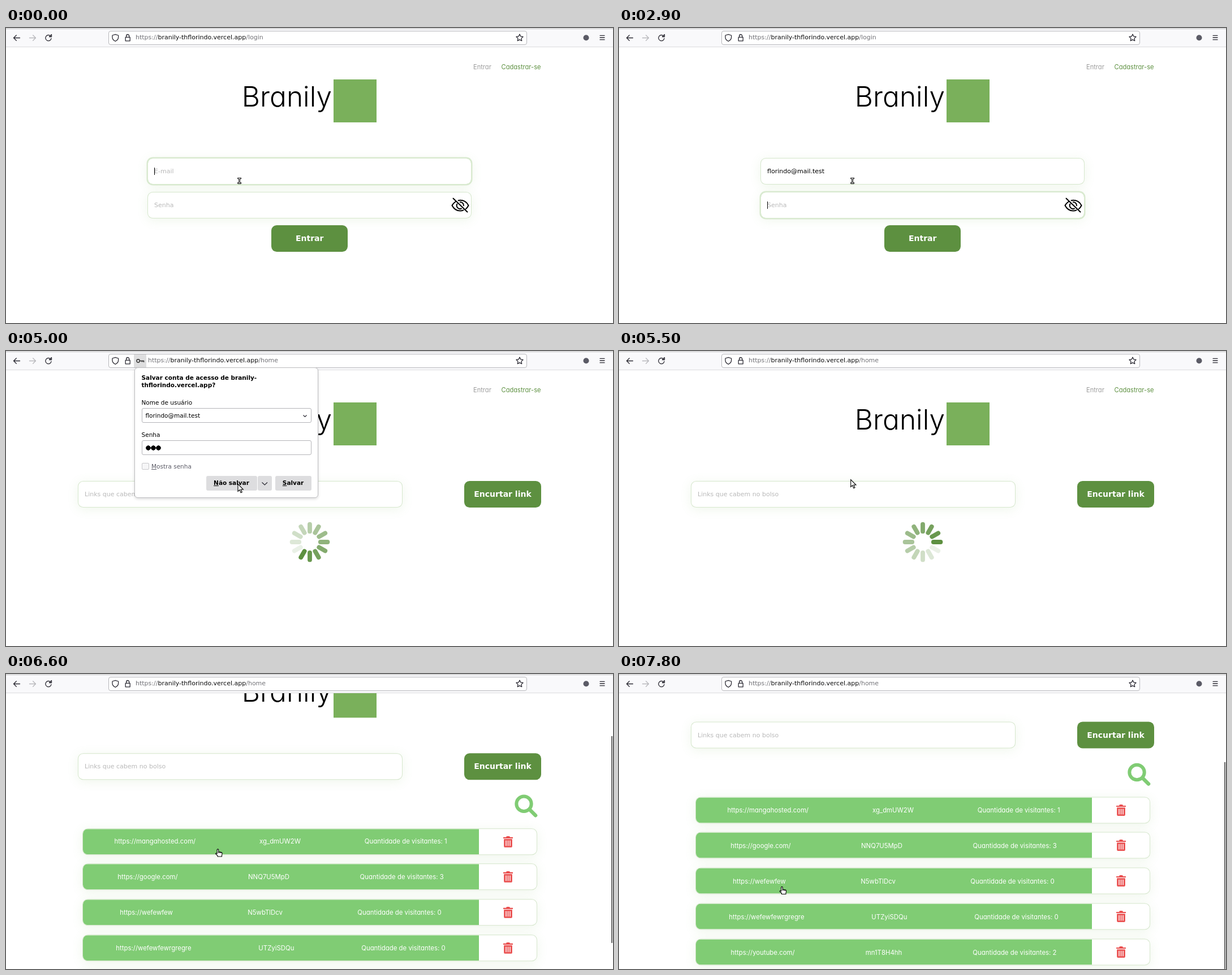
An HTML page for the animation above (8000 ms loop, 1073 by 522 pixels).

```html
<!DOCTYPE html>
<html lang="pt-BR">
<head>
<meta charset="utf-8">
<title>Encurtador de links</title>
<style>
  html, body { margin: 0; width: 100%; height: 100%; overflow: hidden; background: #fff; }
  body { position: relative; font: 11px/16px "DejaVu Sans", sans-serif; color: #000; }
  body *, .abs { box-sizing: border-box; }
  .abs, svg.abs { position: absolute; white-space: pre; }
  [hidden] { display: none !important; }
  .round { font: 11.1px/16px Inter, sans-serif; font-feature-settings: "cv11"; }
  .soft { color: #9c9c9c; }
  .green { color: #5d9040; }

  #brand { right: 497px; top: 91.4px; font: 300 49.6px/60px Inter, sans-serif; font-feature-settings: "cv11"; }
  #mark { left: 579px; top: 91px; width: 76px; height: 76px; background: #7ab05b; }

  .field, .row { border: 1px solid rgba(120,177,89,.3); border-radius: 9.5px; background: #fff;
    box-shadow: 0 3px 19px rgba(120,177,89,.12); }
  .field { width: 573px; height: 47px; padding-left: 11px; display: flex; align-items: center; }
  .field.focus { border-color: #cfe5c4; outline: 2px solid #d9ead0; outline-offset: -1px; }
  .field.focus { box-shadow: 0 0 0 1.5px #d9ead0, 0 3px 19px rgba(120,177,89,.12); }
  .field.off { background: #f1f1f1; }
  .field .hint { color: #b9b9b9; }
  .caret { width: 1px; height: 13px; margin-right: -1px; background: #000; }
  .bullets { height: 9px; background: radial-gradient(circle closest-side, #000 88%, transparent) 0 0 / 9.6px 9px; }
  .button { width: 135.4px; height: 47px; border-radius: 9.5px; background: #5d9040; color: #fff;
    font-weight: bold; font-size: 14px; line-height: 46px; text-align: center; }

  .row { left: 135px; width: 804px; height: 47px; overflow: hidden; }
  .row div { width: 701px; height: 100%; margin-left: -1px; background: #80cc74; color: #fff; font-size: 11.4px;
    display: flex; justify-content: space-around; align-items: center; }
  .row svg { position: absolute; left: 743px; top: 12px; }
  #bar { left: 1069.5px; top: 36px; width: 2.5px; height: 366px; background: #666; }

  #chrome { left: 0; top: 0; width: 1073px; height: 34px; background: #f9f9fb;
    border-bottom: 1px solid #dcdcde; box-shadow: inset 0 1px #f0f0f0, inset 0 2px #c4c4c6; }
  #address { left: 181px; top: 5px; width: 739.5px; height: 25px; background: #fff;
    border: 1px solid #b7b7bb; border-radius: 4px; }
  #url { top: 9px; color: #737378; }
  #url b { font-weight: normal; color: #0c0c0d; }
  #keybox { left: 226px; top: 6px; width: 22px; height: 23px; }

  #popup { left: 226.5px; top: 28.5px; width: 325px; height: 231.5px; background: #fff; font-size: 10.5px;
    border: 1px solid #bdbdc0; border-radius: 6px; box-shadow: 0 2px 5px rgba(0,0,0,.14); }
  #popup .box { left: 12.5px; width: 300px; height: 26px; border: 1px solid #b4b4b8; border-radius: 3px;
    padding-left: 5.5px; line-height: 24px; }
  #popup .act { top: 191.5px; height: 26px; background: #dddddf; border-radius: 3px; font-weight: bold;
    line-height: 25px; text-align: center; }
</style>
</head>
<body>
<div id="doc" class="abs" style="left:0;top:0;width:1073px;height:670px">
  <div id="guest" class="round">
    <span class="abs soft" style="left:826px;top:61px">Entrar</span>
    <span class="abs green" style="right:127.5px;top:61px">Cadastrar-se</span>
  </div>
  <div id="member" class="round">
    <span class="abs green" style="left:127px;top:61px">Seja bem-vindo(a), Florindo Pontelo!</span>
    <span class="abs soft" style="left:826px;top:61px">Home</span>
    <span class="abs soft" style="left:869px;top:61px">Ranking</span>
    <span class="abs soft" style="right:127.5px;top:61px">Sair</span>
  </div>
  <div id="brand" class="abs">Branily</div>
  <div id="mark" class="abs"></div>

  <div id="login">
    <div id="mail" class="abs field" style="left:250px;top:230px"><span></span><i class="caret"></i><span class="hint">E-mail</span></div>
    <div id="pass" class="abs field" style="left:250px;top:290px"><span class="bullets"></span><i class="caret"></i><span class="hint">Senha</span></div>
    <svg class="abs" style="left:787px;top:299px" width="32" height="30" fill="none" stroke="#000" stroke-width="2" stroke-linecap="round">
      <path d="M3.5 2.5L28.5 26.5M8 8C4.5 10.5 2.5 13 1.5 15C4 20 9 24.5 16 24.5C18 24.5 20 24 21.5 23.3M12.5 6.3C13.5 6 14.8 5.8 16 5.8C23 5.8 28 10 30.5 15C29.5 17.2 28 19.3 26 21M10.3 12.5A6 6 0 0 0 18 20.6M15.8 9A6 6 0 0 1 22 15.2"/>
    </svg>
    <div id="enter" class="abs button" style="left:469px;top:349px">Entrar</div>
    <svg id="wait" class="abs" style="left:469px;top:349px" width="135" height="47" fill="#fff"></svg>
  </div>

  <div id="home">
    <div class="abs field" style="left:127px;top:230.4px;width:574px"><span class="hint">Links que cabem no bolso</span></div>
    <div class="abs button" style="left:810.3px;top:230.4px">Encurtar link</div>
    <svg id="spinner" class="abs" style="left:498.5px;top:299.5px" width="76" height="76" viewBox="-24.2 -24.2 48.4 48.4" stroke="#5d9040" stroke-width="5" stroke-linecap="round"></svg>
    <div id="list" class="round">
      <svg class="abs" style="left:898px;top:302px" width="42" height="42" fill="none" stroke="#80cc74">
        <circle cx="17.5" cy="17.5" r="13.2" stroke-width="6"/>
        <path d="M28 28L38 38" stroke-width="6.5" stroke-linecap="round"/>
      </svg>
    </div>
  </div>
</div>
<div id="bar" class="abs"></div>

<div id="chrome" class="abs">
  <div id="address" class="abs"></div>
  <div id="keybox" class="abs"><svg width="22" height="23" fill="none" stroke="#333" stroke-width="1.4">
    <circle cx="7.6" cy="11.5" r="2.7"/><path d="M10.3 11.5H17.5V14M14.5 11.5V13.6"/></svg></div>
  <span id="url" class="abs">https://<b>branily-thflorindo.vercel.app</b><span></span></span>
  <svg class="abs" style="left:0;top:0" width="1073" height="34" fill="none" stroke="#2b2a33" stroke-width="1.3" stroke-linejoin="round" stroke-linecap="round">
    <path d="M24.5 17.5H13.5M18.3 12.7L13.5 17.5L18.3 22.3"/>
    <path stroke="#b8b8bc" d="M41.5 17.5H52.5M47.7 12.7L52.5 17.5L47.7 22.3"/>
    <path d="M80 18.5A5.1 5.1 0 1 1 78.6 14M80.5 11.5V15.5H76.5Z"/>
    <path d="M193.3 11.3L198.6 13V16.5C198.6 20 196.3 22 193.3 23.5C190.3 22 188 20 188 16.5V13Z"/>
    <path d="M211.2 16.3H219.2V22.8H211.2ZM212.7 16V14A2.5 2.5 0 0 1 217.7 14V16"/>
    <path d="M908 11L909.9 14.9L914 15.5L911 18.4L911.7 22.6L908 20.6L904.3 22.6L905 18.4L902 15.5L906.1 14.9Z"/>
    <circle cx="1025.5" cy="17.2" r="5" fill="#5b5b66" stroke="none"/>
    <path d="M1050 13.3H1058M1050 17H1058M1050 20.7H1058"/>
  </svg>
</div>

<div id="popup" class="abs">
  <b class="abs" style="left:12px;top:11.3px;line-height:13.6px">Salvar conta de acesso de branily-
thflorindo.vercel.app?</b>
  <span class="abs" style="left:12px;top:53px">Nome de usuário</span>
  <div class="abs box" style="top:71.5px">florindo@mail.test</div>
  <span class="abs" style="left:12px;top:110px">Senha</span>
  <div class="abs box" style="top:128px"></div>
  <div class="abs bullets" style="left:19px;top:137px;width:27px;background-size:9px 9px"></div>
  <div class="abs" style="left:12.5px;top:168px;width:12.5px;height:12.5px;border:1px solid #c8c8cb;border-radius:2px;background:#f6f6f7"></div>
  <span class="abs" style="left:29.5px;top:166px;color:#5b5b66"><u>M</u>ostra senha</span>
  <div class="abs act" style="left:126px;width:90px"><u>N</u>ão salvar</div>
  <div class="abs act" style="left:217px;width:25px"></div>
  <div class="abs act" style="left:248px;width:64px"><u>S</u>alvar</div>
  <svg class="abs" style="left:0;top:0" width="323" height="229" fill="none" stroke="#2b2a33" stroke-width="1.2">
    <path d="M297.5 83.5L300.5 86.5L303.5 83.5M224.5 202.5L229.3 207L234 202.5"/></svg>
</div>

<svg id="mouse" class="abs" style="left:0;top:0" width="1073" height="522">
  <g id="beam" fill="none" stroke="#000" stroke-width="2.8" stroke-linecap="round">
    <path id="stem" d="M-.6 -1.2H3.8M1.6 -1.2V7.2M-.6 7.2H3.8"/>
    <path d="M-.6 -1.2H3.8M1.6 -1.2V7.2M-.6 7.2H3.8" stroke="#fff" stroke-width=".9"/></g>
  <path id="arrow" d="M0 0V13L3 10.2L5.2 15.2L7.3 14.3L5.2 9.5H9.3Z" fill="#fff" stroke="#000" stroke-width="1.1"/>
  <path id="hand" d="M-1.3 8V0.8Q0 -1 1.2 0.8V4.6L6.4 5.6Q7.8 6 7.7 7.5L7 11V13H-.5V11.5L-4 8.2Q-3.8 6.2 -1.3 8ZM1.2 5V7M3.6 5.4V7M5.7 5.8V7.2" fill="#fff" stroke="#000" stroke-width="1.1" stroke-linejoin="round"/>
</svg>

<script>
const $ = id => document.getElementById(id);
const show = (id, on) => $(id).toggleAttribute('hidden', !on);

const email = 'florindo@mail.test';
const mailKeys = [100, 200, 400, 500, 600, 700, 900, 1000, 1400, 1800, 1900, 2000, 2100, 2300, 2500, 2600, 2700, 2800];
const passKeys = [3300, 3500, 3600];
const mousePath = [[0, 411, 267.3], [4600, 411, 267.3], [5100, 409.7, 227.5], [5600, 409.7, 227.5],
  [6200, 374.5, 310], [6800, 374.5, 310], [7600, 297, 347], [7800, 288, 376.5]];
const scrollPath = [[6300, 0], [6600, 89.7], [6700, 89.7], [7000, 145.5]];

const links = [
  ['https://mangahosted.com/', 'xg_dmUW2W', 1],
  ['https://google.com/', 'NNQ7U5MpD', 3],
  ['https://wefewfew', 'N5wbTlDcv', 0],
  ['https://wefewfewrgregre', 'UTZyiSDQu', 0],
  ['https://youtube.com/', 'mn1T8H4hh', 2]
];
const trash = `<svg width="17" height="21" fill="#ea4f4f"><path d="M0 2.4H5L6 0.6H11L12 2.4H17V4.6H0Z"/>
  <path d="M1.2 5.8H15.8V18.6Q15.8 20.5 14 20.5H3Q1.2 20.5 1.2 18.6Z"/>
  <path d="M5 8.3V18M8.5 8.3V18M12 8.3V18" stroke="#fff" stroke-width="1.5"/></svg>`;
$('list').innerHTML += links.map(([url, code, visits], i) =>
  `<div class="abs row" style="top:${362.5 + 62.9 * i}px"><div><span>${url}</span><span>${code}</span>` +
  `<span>Quantidade de visitantes: ${visits}</span></div>${trash}</div>`).join('');

// Spinner tail fades counterclockwise from its head at three o'clock.
$('spinner').innerHTML = Array.from({length: 12}, (_, i) =>
  `<path d="M12 0H20" transform="rotate(${-30 * i})" opacity="${1 - i / 12.6}"/>`).join('');

const count = (times, t) => times.filter(k => k <= t).length;

function along(path, t) {
  const next = path.findIndex(p => p[0] > t);
  if (next < 0) return path.at(-1).slice(1);
  if (!next) return path[0].slice(1);
  const a = path[next - 1], b = path[next], f = (t - a[0]) / (b[0] - a[0]);
  return a.slice(1).map((v, i) => v + (b[i + 1] - v) * f);
}

function field(id, typed, focus, off) {
  const el = $(id), [, caret, hint] = el.children;
  el.classList.toggle('focus', focus);
  el.classList.toggle('off', off);
  caret.hidden = !focus || off;
  hint.hidden = typed > 0;
  return el.firstElementChild;
}

function draw(now) {
  const t = Math.floor(now % 8000 / 100) * 100;
  const sending = t >= 3900, home = t >= 4800, listed = t >= 5600;
  const popup = t >= 4000 && t < 5200, key = t >= 3300 && t < 5200;

  show('login', !home);
  show('home', home);
  show('guest', !listed);
  show('member', listed);
  show('list', listed);
  show('bar', listed);
  show('spinner', !listed);
  show('popup', popup);
  show('keybox', key);
  $('keybox').style.background = popup ? '#dededf' : 'none';
  $('url').style.left = (key ? 251 : 229) + 'px';
  $('url').lastChild.textContent = home ? '/home' : '/login';

  const letters = count(mailKeys, t), dots = count(passKeys, t);
  field('mail', letters, t < 2900, sending).textContent = email.slice(0, letters);
  field('pass', dots, t >= 2900, sending).style.width = dots * 9.6 + 'px';

  $('enter').style.opacity = sending ? .7 : 1;
  $('enter').textContent = sending ? '' : 'Entrar';
  show('wait', sending);
  const swing = Math.abs((t + 200) % 800 / 400 - 1);
  $('wait').innerHTML = [0, 1, 2].map(i => {
    const p = i === 1 ? 1 - swing : swing;
    return `<circle cx="${43.5 + 23.6 * i}" cy="23.5" r="${4.7 + 3.2 * p}" opacity="${.5 + .5 * p}"/>`;
  }).join('');
  $('spinner').style.transform = `rotate(${30 * Math.floor((t - 5500) / 62.5)}deg)`;

  const [scroll] = along(scrollPath, t), [x, y] = along(mousePath, t);
  $('doc').style.transform = `translateY(${-scroll}px)`;
  $('bar').style.transform = `translateY(${scroll * .824}px)`;

  const depth = y + scroll - 362.5;
  const hand = listed && depth >= 0 && depth % 62.9 < 47;
  show('beam', !sending);
  show('hand', hand);
  show('arrow', sending && !hand);
  for (const id of ['beam', 'hand', 'arrow']) $(id).setAttribute('transform', `translate(${x} ${y})`);

  requestAnimationFrame(draw);
}
draw(0);
</script>
</body>
</html>
```
